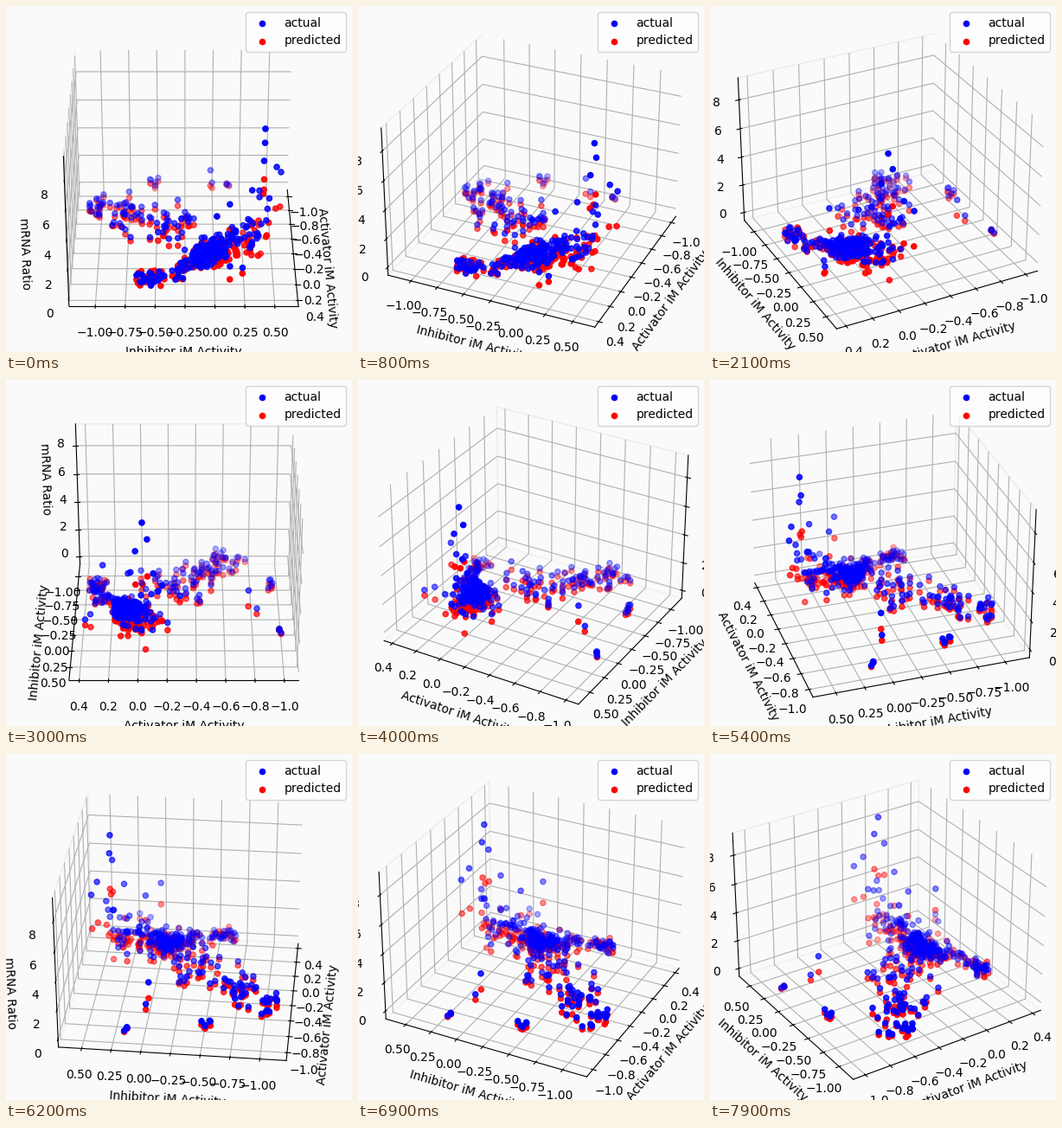
A matplotlib script that plays this animation: 400x400 px, repeating every 8 s.

```python
import matplotlib.pyplot as plt
import numpy as np
from matplotlib.animation import FuncAnimation

FRAMES = 80
STEP = 3  # degrees of azimuth per frame
BG = "#fafafa"

rng = np.random.default_rng(11)


def with_fit(x, y, z):
    """Add a prediction that falls further short the higher the point."""
    fit = z - 0.3 * z ** 1.2 + rng.normal(0, 0.1, len(z)) * z
    return np.column_stack([x, y, z, fit])


def blob(n, x, y, z, spread):
    height = z * np.maximum(rng.normal(1, 0.25, n), 0.3)
    return with_fit(rng.normal(x, spread, n), rng.normal(y, spread, n), height)


def streak():
    """Main band: a flat tail, a dense core and a loose rising end."""
    y = np.concatenate([rng.uniform(-0.68, -0.42, 26),
                        rng.normal(-0.08, 0.13, 155),
                        rng.normal(0.27, 0.1, 28)])
    bend = np.clip(-(y + 0.1) / 0.35, 0, 1)
    width = 0.035 + 0.08 * np.clip(y + 0.45, 0, 0.6)
    x = 0.06 + 0.27 * bend - 0.12 * np.maximum(y, 0) + rng.normal(0, width)
    z = (1.2 + 2.3 * y + 2 * y ** 2) * rng.normal(1, 0.28, y.size)
    fit = (0.85 + 0.9 * y + 0.6 * y ** 2) * rng.normal(1, 0.3, y.size)
    return np.column_stack([x, y, z, fit])


# isolated high points: x, y, z
peaks = np.array([
    (-0.035, 0.416, 8.90), (-0.068, 0.418, 7.81), (0.013, 0.409, 6.99),
    (-0.109, 0.524, 5.98), (-0.168, 0.566, 5.34), (0.049, 0.313, 5.18),
    (0.249, 0.015, 4.43), (0.071, 0.127, 4.33), (0.371, 0.229, 1.55),
])

data = np.vstack([
    with_fit(*peaks.T),
    streak(),
    blob(3, -0.08, 0.47, 3.9, 0.05),
    blob(26, -0.28, -0.32, 1.3, 0.11),
    blob(16, -0.58, -1.02, 0.7, 0.07),
    blob(28, -0.48, -0.75, 0.95, 0.12),
    blob(5, -0.94, -0.51, 0.85, 0.03),
    blob(2, -0.79, -0.01, 1.8, 0.025),
    blob(3, -0.98, 0.14, 0.4, 0.01),
])
x = np.clip(data[:, 0], -0.996, 0.371)
y = np.clip(data[:, 1], -1.10, 0.575)
actual, predicted = np.maximum(data[:, 2:], 0.1).T

fig = plt.figure(figsize=(4, 4), dpi=100, facecolor=BG)
ax = fig.add_axes([0, 0, 1, 1], projection="3d", computed_zorder=False)
ax.set_facecolor("none")

ax.scatter(x, y, actual, c="blue", s=20, zorder=3, label="actual")
ax.scatter(x, y, predicted, c="red", s=20, zorder=2, label="predicted")

ax.set_xlabel("Activator iM Activity")
ax.set_ylabel("Inhibitor iM Activity")
ax.set_zlabel("mRNA Ratio")
ax.set_xticks(np.linspace(-1, 0.4, 8).round(1))
ax.set_yticks(np.linspace(-1, 0.5, 7))
ax.set_zticks(range(0, 9, 2))
ax.set_xlim(-1.096, 0.470)
ax.set_ylim(-1.220, 0.697)
ax.set_zlim(-0.575, 9.51)

for axis, edge in zip((ax.xaxis, ax.yaxis, ax.zaxis), (BG, "#ececec", "#f3f3f3")):
    axis.pane.set_fill(False)
    axis.pane.set_alpha(1)
    axis.pane.set_edgecolor(edge)

ax.legend(loc="upper right").set_zorder(10)


def update(i):
    ax.view_init(elev=30, azim=STEP * i)
    return []


anim = FuncAnimation(fig, update, frames=FRAMES, interval=100,
                     init_func=lambda: update(0), repeat=True, repeat_delay=0)
plt.show()
```
